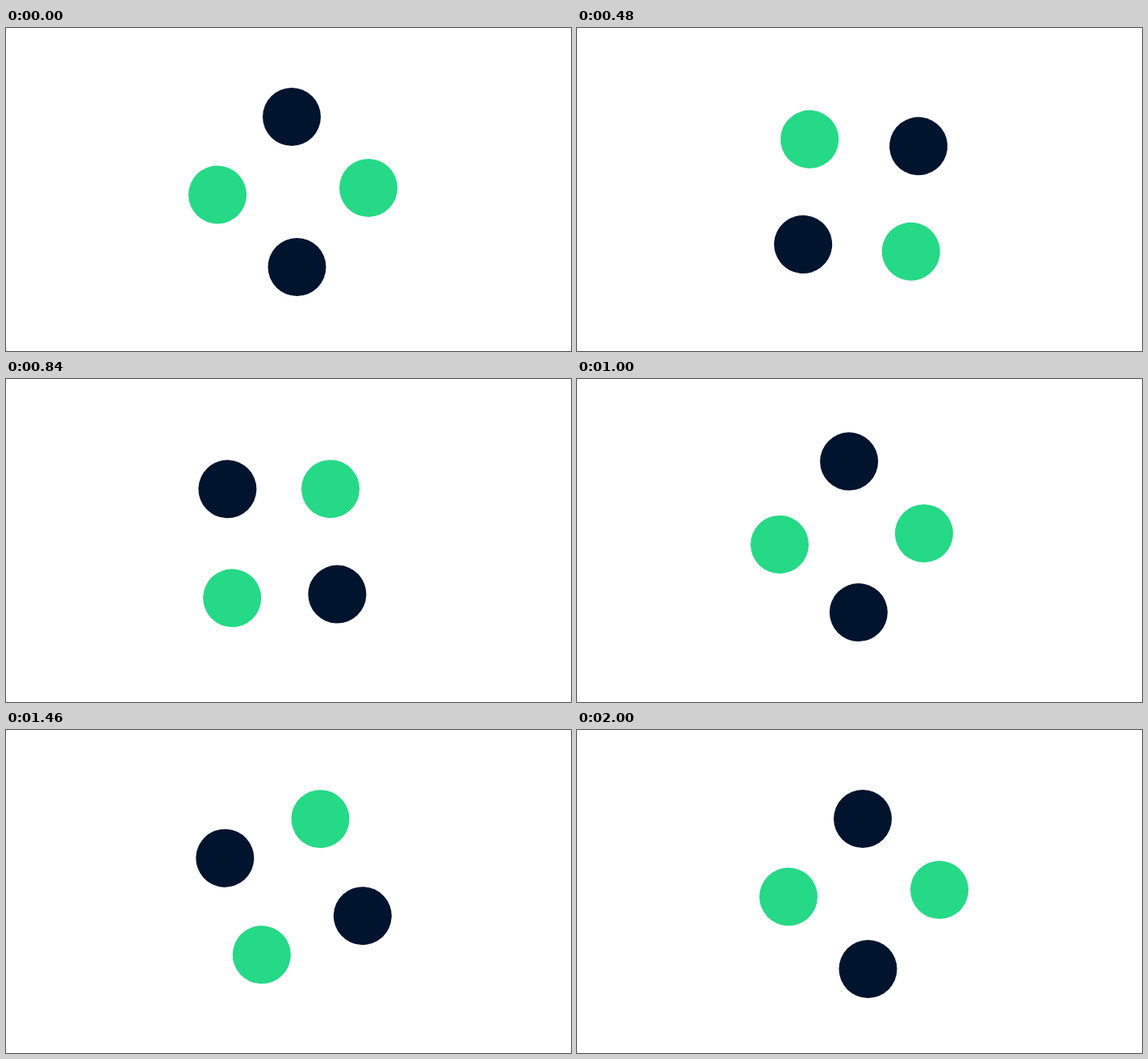
An HTML page that plays this animation: 700x400 px, repeating every 2.24 s.

```html
<!DOCTYPE html>
<html lang="en">
<head>
<meta charset="utf-8">
<title>Turning dots</title>
<style>
  html, body { margin: 0; width: 100%; height: 100%; overflow: hidden; background: #fff; }
  svg { display: block; }
</style>
</head>
<body>
<svg width="700" height="400" viewBox="0 0 700 400">
  <g fill="#00142e">
    <circle r="36" cx="354" cy="110" data-pivot="351 199.5"/>
    <circle r="36" cx="360.5" cy="296" data-pivot="349.25 199"/>
  </g>
  <g fill="#25d986">
    <circle r="36" cx="449" cy="198" data-pivot="350 201"/>
    <circle r="36" cx="262" cy="206.5" data-pivot="346 199.25"/>
  </g>
</svg>
<script>
  const LOOP = 2240, STEP = 20, DELAY = 4, TURN_END = 2000;
  const dots = document.querySelectorAll('circle');
  const start = performance.now();

  const clamp = x => Math.min(1, Math.max(0, x));
  const ease = p => p * p * (3 - 2 * p);

  function draw() {
    const elapsed = (performance.now() - start) % LOOP;
    const time = Math.floor(elapsed / STEP) * STEP;
    const angle = 360 * ease(clamp((time - DELAY) / (TURN_END - DELAY)));
    // Each dot makes one turn around its own, slightly shifted pivot.
    for (const dot of dots) {
      dot.setAttribute('transform', `rotate(${angle} ${dot.dataset.pivot})`);
    }
    requestAnimationFrame(draw);
  }
  draw();
</script>
</body>
</html>
```
